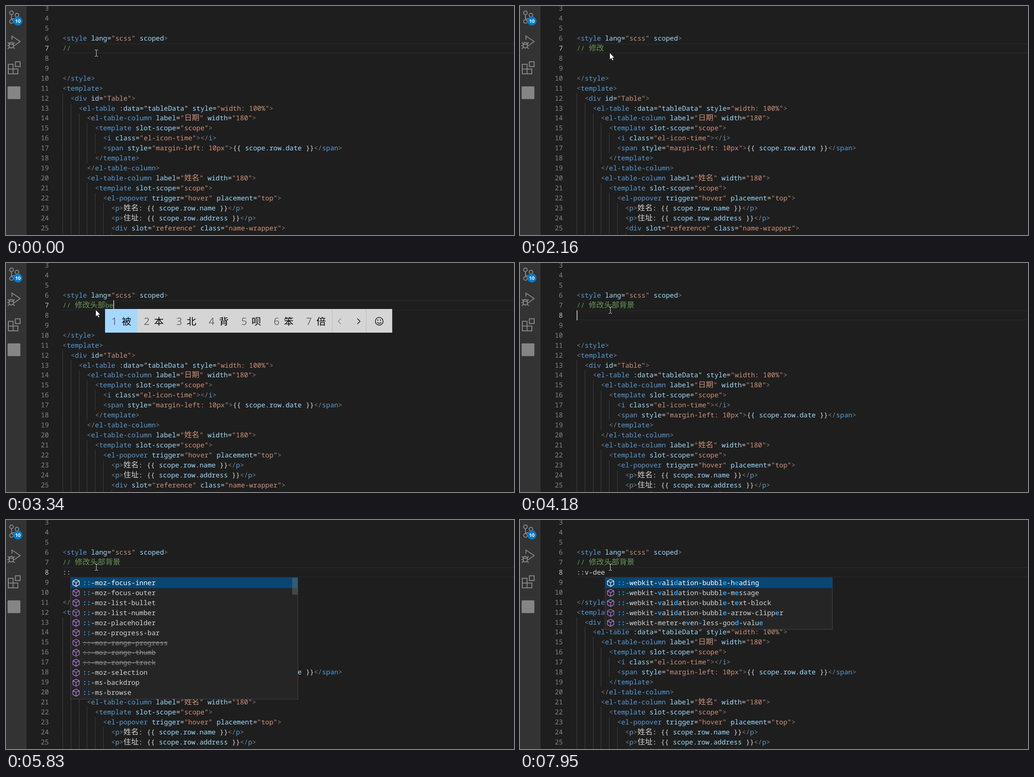
An HTML page for the animation above (8000 ms loop, 1113 px wide and 503 px high).

```html
<!DOCTYPE html>
<html lang="zh">
<head>
<meta charset="utf-8">
<title>Typing a scoped style</title>
<style>
  html, body { margin: 0; width: 100%; height: 100%; overflow: hidden; background: #1e1e1e; }
  svg { display: block; }
  text { font: 500 14.8px "Noto Sans Mono", monospace; white-space: pre; text-rendering: geometricPrecision; fill: #d4d4d4; }
  .cjk { font-family: "Noto Sans CJK SC", "Noto Sans CJK", sans-serif; font-size: 16.7px; font-weight: 400; }
  .punct { fill: #808080; }
  .tag { fill: #569cd6; }
  .attr, .name { fill: #9cdcfe; }
  .string { fill: #ce9178; }
  .comment { fill: #6a9955; }
  .number { fill: #858585; text-anchor: end; }
  .current { fill: #c6c6c6; }
  .chosen { fill: #fff; }
  .match { fill: #18a3ff; font-weight: bold; }
  .old { fill: #8c8c8c; text-decoration: line-through; }
  .icon { fill: none; stroke: #858585; stroke-width: 2; }
  .badge { font: bold 10.5px "Open Sans", sans-serif; fill: #fff; text-anchor: middle; }
  .index { font: 22px "Open Sans", sans-serif; fill: #686868; }
  .word { font: 21px "Noto Sans CJK SC", "Noto Sans CJK", sans-serif; fill: #000; }
</style>
</head>
<body>
<svg width="1113" height="503" viewBox="0 0 1113 503">
  <rect width="1113" height="503" fill="#1e1e1e"/>
  <g id="editor"></g>
  <rect width="45" height="503" fill="#333"/>
  <g class="icon">
    <circle cx="12" cy="15" r="4"/><circle cx="12" cy="34" r="4"/><circle cx="24" cy="20" r="4"/>
    <path d="M12 19V30M24 24Q23 28 18 28H15Q12 28 12 30"/>
    <path d="M13 74V66L31 78L20 86"/>
    <path d="M7 84Q7 80 11.500 80Q16 80 16 84V88Q16 92 11.500 92Q7 92 7 88ZM7 84H16M4 80L7 83M19 80L16 83M3 87H7M16 87H20M4 94L8 90M19 94L15 90"/>
    <path d="M5 128H15.500V149H5ZM5 138.500H26V149H5M20.500 122.500H31V133H20.500Z"/>
  </g>
  <circle cx="26" cy="33" r="10" fill="#007acc"/>
  <text class="badge" x="26" y="36.800">10</text>
  <rect x="3.500" y="176.500" width="28" height="28" rx="1.500" fill="#858585"/>
  <g id="overlay"></g>
  <g id="pointer"></g>
</svg>
<script>
const LOOP = 8000, LEFT = 124, CHAR = 8.88, WIDE = 16.7, LINE = 21.92;
const FIRST = 3, NOTE = 7;
const lineTop = n => 82 + (n - NOTE) * LINE;

const markup = `</style>
<template>
  <div id="Table">
    <el-table :data="tableData" style="width: 100%">
      <el-table-column label="日期" width="180">
        <template slot-scope="scope">
          <i class="el-icon-time"></i>
          <span style="margin-left: 10px">{{ scope.row.date }}</span>
        </template>
      </el-table-column>
      <el-table-column label="姓名" width="180">
        <template slot-scope="scope">
          <el-popover trigger="hover" placement="top">
            <p>姓名: {{ scope.row.name }}</p>
            <p>住址: {{ scope.row.address }}</p>
            <div slot="reference" class="name-wrapper">
              <el-tag size="medium">`.split('\n');

const bubble = '[::-]webkit-[v]alidation-bubble';
const meter = '[::]-webkit-meter-e[v]en[-]less-goo[d]-value';
const mozHints = [...'focus-inner focus-outer list-bullet list-number placeholder progress-bar ~range-progress ~range-thumb ~range-track selection'
  .split(' ').map(s => s[0] === '~' ? '~::-moz-' + s.slice(1) : '[::]-moz-' + s),
  '[::]-ms-backdrop', '[::]-ms-browse'];
const dashHints = ['[::-]ms-[v]alue',
  ...['', '-arrow', '-arrow-clipper', '-heading', '-message', '-text-block'].map(s => bubble + s),
  '[::-]ms-re[v]eal', '[::-]webkit-progress-[v]alue', '[::-]webkit-meter-optimum-[v]alue',
  '~::-webkit-progress-inner-value', '[::-]webkit-meter-suboptimum-[v]alue'];
const vHints = dashHints.map(s => s.replace('[::-]', '[::]-'));
const dHints = [...dashHints.slice(1, 7).map(s => s.replace('lida', 'li[d]a')), meter];
const deHints = dHints.map(s => s.replace('bubble', 'bubbl[e]').replace(/value$/, 'valu[e]'));
const deeHints = ['-h[e]ading', '-m[e]ssage', '-t[e]xt-block', '-arrow-clipp[e]r']
  .map(s => bubble.replace('lida', 'li[d]a').replace(/e$/, '[e]') + s).concat(deHints[6]);

const noteStep = (t, done, typed = '', words = '', caret = 1) => ({ t, done, typed, words, caret });
const ruleStep = (t, rule, hints = [], thumb = 0, caret = 1) =>
  ({ t, done: '// 修改头部背景', typed: '', words: '', rule, hints, thumb, caret });

const steps = [
  noteStep(0, '// ', '', '', 0),
  noteStep(60, '// ', 'x', '下 想 小 笑 像 行 写'),
  noteStep(180, '// ', 'xi', '系 西 洗 喜 细 息 吸'),
  noteStep(300, '// ', 'xiu', '修 秀 休 绣 袖 嗅 羞'),
  noteStep(420, '// ', "xiu'g", '修改 修个 修过 秀过 秀个 休刊 修管'),
  noteStep(540, '// ', "xiu'ga", '修改 修盖 秀感 修干 修刚 休干 修该'),
  noteStep(660, '// 修改'),
  noteStep(1200, '// 修改', '', '', 0),
  noteStep(1700, '// 修改'),
  noteStep(2160, '// 修改', '', '', 0),
  noteStep(2300, '// 修改', 't', '他 天 听 太 同 条 头'),
  noteStep(2430, '// 修改', 'to', '头 同 通 投 痛 偷 统'),
  noteStep(2560, '// 修改', 'tou', '头 投 偷 透 骰 亠 钭'),
  noteStep(2700, '// 修改', "tou'b", '头部 头边 投不 头版 投保 投标 头痹'),
  noteStep(2830, '// 修改', "tou'bu", '头部 投不 头 投 偷 透 骰'),
  noteStep(2980, '// 修改头部'),
  noteStep(3120, '// 修改头部', 'b', '不 吧 把 被 本 比 别'),
  noteStep(3280, '// 修改头部', 'be', '被 本 北 背 呗 笨 倍'),
  noteStep(3390, '// 修改头部', 'bei', '被 北 背 呗 倍 杯 悲'),
  noteStep(3500, '// 修改头部', "bei'j", '背景 北京 悲剧 北极 背井 背脊 北疆'),
  noteStep(3890, '// 修改头部背景'),
  ruleStep(4180, ''),
  ruleStep(4640, '', [], 0, 0),
  ruleStep(5180, ':'),
  ruleStep(5260, '::'),
  ruleStep(5400, '::', mozHints, 37),
  ruleStep(5830, '::', mozHints, 37, 0),
  ruleStep(6350, '::v', vHints, 248),
  ruleStep(6720, '::v-', dashHints, 248),
  ruleStep(6860, '::v-d', dHints),
  ruleStep(7270, '::v-de', deHints),
  ruleStep(7410, '::v-dee', deeHints),
  ruleStep(7950, '::v-dee', deeHints, 0, 0),
];

const escape = s => s.replace(/</g, '&lt;').replace(/>/g, '&gt;');
const isWide = c => c >= '\u4e00' && c <= '\u9fff';
const endOf = s => [...s].reduce((x, c) => x + (isWide(c) ? WIDE : CHAR), LEFT);
const span = (s, cls) => `<tspan class="${cls}">${s}</tspan>`;
const withWide = s => escape(s).replace(/[\u4e00-\u9fff]+/g, w => span(w, 'cjk'));
const text = (x, y, body, cls = '') => `<text x="${x}" y="${y}" class="${cls}">${body}</text>`;
const rect = (x, y, w, h, fill, extra = '') =>
  `<rect x="${x}" y="${y}" width="${w}" height="${h}" fill="${fill}" ${extra}/>`;
const path = (d, stroke, extra = '') => `<path d="${d}" fill="none" stroke="${stroke}" ${extra}/>`;

const TOKEN = /(?<tag>(?<=<\/?)[\w-]+)|(?<punct><\/?|>)|(?<attr>[\w-]+(?==)|scoped)|(?<string>(?<==)"(?!tableData)[^"]*")|(?<name>(?<=\{\{ [\w.]*)\w+|(?<=:data=")\w+)|(?<text>[^])/g;
function highlight(line) {
  return line.replace(TOKEN, (s, ...rest) => {
    const groups = rest.at(-1);
    return span(withWide(s), Object.keys(groups).find(k => groups[k] !== undefined));
  });
}

function drawEditor(step) {
  const hasRule = step.rule !== undefined;
  const current = hasRule ? NOTE + 1 : NOTE;
  const lines = ['', '', '', '<style lang="scss" scoped>', step.done + step.typed,
    ...(hasRule ? [step.rule] : []), '', '', ...markup];
  let out = [0, LINE - 1.5].map(dy => rect(LEFT, lineTop(current) + dy, 989, 1.5, '#282828')).join('');
  lines.forEach((line, i) => {
    const n = FIRST + i, top = lineTop(n), y = top + 16;
    if (top > 503) return;
    const indent = line.search(/\S|$/);
    for (let k = 0; k < indent && n > NOTE; k += 2)
      out += rect(Math.round(LEFT + k * CHAR), top, 1, LINE + 0.1, '#404040');
    out += text(94, y, n, n === current ? 'number current' : 'number');
    if (n === NOTE) out += text(LEFT, y, withWide(line), 'comment');
    else if (hasRule && n === current) out += text(LEFT, y, line);
    else out += text(LEFT + indent * CHAR, y, highlight(line.slice(indent)));
  });
  if (step.caret) {
    const x = endOf(hasRule ? step.rule : step.done + step.typed);
    out += rect(Math.floor(x), Math.round(lineTop(current)), 2, 22, '#aeafad');
  }
  return out;
}

function drawWords(step) {
  const left = Math.floor(endOf(step.done)), words = step.words.split(' ');
  const widthOf = w => 50.6 + 20.5 * w.length;
  const end = left + words.reduce((sum, w) => sum + widthOf(w), 0);
  let x = left;
  let out = rect(left, 101, end - left + 131.5, 52, '#d5d5d5') + rect(left, 101, widthOf(words[0]), 52, '#a6d8ff');
  words.forEach((w, i) => {
    out += text(x + 14, 136, i + 1, 'index') + text(x + 36.5, 136, w, 'word');
    x += widthOf(w);
  });
  out += path(`M${end} 101v52m74.500 0v-52`, '#bcbcbc');
  out += path(`M${end + 19} 122l-6 6l6 6`, '#888', 'stroke-width="1.5"');
  out += path(`M${end + 55} 122l6 6l-6 6`, '#111', 'stroke-width="1.5"');
  const cx = end + 103;
  out += `<circle cx="${cx}" cy="128" r="8.5" fill="none" stroke="#111" stroke-width="1.5"/>`;
  out += `<circle cx="${cx - 3}" cy="125.500" r="1.2"/><circle cx="${cx + 3}" cy="125.500" r="1.2"/>`;
  return out + path(`M${cx - 4.5} 130q4.500 5 9 0`, '#111', 'stroke-width="1.4"');
}

function drawHints({ rule, hints, thumb }) {
  const left = Math.floor(endOf(rule)), top = 127;
  let out = rect(left + 0.5, top - 0.5, 498, hints.length * LINE + 4, '#252526', 'stroke="#454545"');
  out += rect(left, top - 1, 499, LINE + 1.5, '#094771');
  hints.forEach((hint, i) => {
    const y = top + i * LINE, old = hint[0] === '~';
    out += path(`M${left + 12.5} ${y + 3.5}l7 3.500v8l-7 4l-7-4v-8zm-7 3.500l7 3.500l7-3.500m-7 3.500v8.500`,
      i ? '#b180d7' : '#fff', 'stroke-width="1.3" stroke-linejoin="round"');
    const body = old ? hint.slice(1) : hint.replace(/\[(.*?)\]/g, (_, s) => span(s, 'match'));
    out += text(left + 27, y + 16, body, old ? 'old' : i ? '' : 'chosen');
  });
  if (thumb) out += rect(left + 486, top, 12, thumb, '#797979', 'fill-opacity=".4"');
  return out;
}

const arrow = '<path d="M196.500 102.500v15.500l3.500-3.300l2.300 5.300l2.500-1.100l-2.300-5.100h4.500z" fill="#fff" stroke="#111" stroke-width=".8"/>';
const beam = path('M194.500 96.500h2.500l1 1l1-1h2.500M198 97v13M194.500 110.500h2.500l1-1l1 1h2.500', '#e0e0e0');

const [editor, overlay, pointer] = ['editor', 'overlay', 'pointer'].map(id => document.getElementById(id));
let shown;
function render(time) {
  const step = steps.findLast(s => s.t <= time);
  if (step === shown) return;
  shown = step;
  editor.innerHTML = drawEditor(step);
  overlay.innerHTML = step.words ? drawWords(step) : step.hints?.length ? drawHints(step) : '';
  pointer.innerHTML = step.t >= 60 && step.t < 4180 ? arrow : beam;
}

let start;
function tick(now) {
  start ??= now;
  render((now - start) % LOOP);
  requestAnimationFrame(tick);
}
render(0);
requestAnimationFrame(tick);
</script>
</body>
</html>
```
